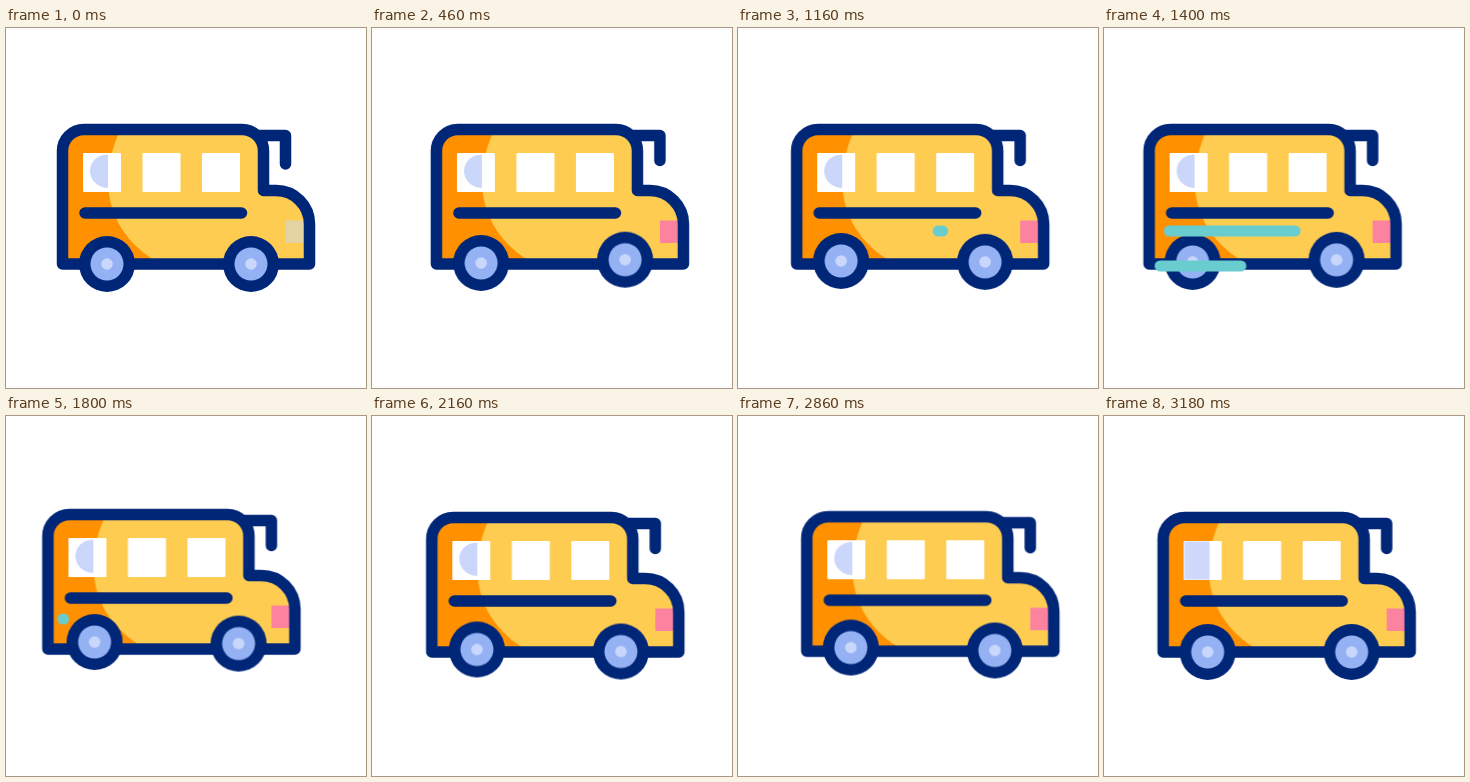
Animation, 360 px wide and 360 px high, one loop 3200 ms. Source, as an HTML page:

```html
<!DOCTYPE html>
<html lang="en">
<head>
<meta charset="utf-8">
<title>School bus</title>
<style>
  html, body { margin: 0; width: 100%; height: 100%; overflow: hidden; background: #fff; }
  svg { display: block; width: 100vw; height: 100vh; }

  .line { fill: none; stroke: #002678; stroke-width: 11.5; stroke-linecap: round; stroke-linejoin: round; }
  .speed { fill: none; stroke: #69ccce; stroke-width: 11; stroke-linecap: round; stroke-dasharray: 100 200; }

  .anim { animation: 3200ms cubic-bezier(.37, 0, .63, 1) infinite; }
  .drive { animation-name: drive; }
  .hop { animation-name: hop; }
  .axles { animation-name: axles; }
  .rear { animation-name: rear; }
  .front { animation-name: front; }
  .lamp { animation-name: lamp; animation-timing-function: step-end; }
  .arm-still { animation-name: still; animation-timing-function: step-end; }
  .arm-moving { animation-name: moving; animation-timing-function: step-end; }
  .glare { animation-name: glare; animation-timing-function: step-end; }
  .pane { animation-name: pane; animation-timing-function: step-end; }
  .upper { animation-name: upper; animation-timing-function: linear; }
  .lower { animation-name: lower; animation-timing-function: linear; }

  @keyframes drive {
    0% { transform: translateX(0); }
    6.875% { transform: translateX(0); animation-timing-function: cubic-bezier(.52, 0, .55, 1); }
    22.5% { transform: translateX(19px); }
    51.25% { transform: translateX(-17px); }
    81.25% { transform: translateX(18.7px); }
    100% { transform: translateX(2.6px); }
  }
  @keyframes hop {
    0%, 14.375% { transform: translateY(0); }
    18.75% { transform: translateY(-6px); }
    23.4%, 46.9% { transform: translateY(0); }
    53.1% { transform: translateY(-6px); }
    59.4%, 81.25% { transform: translateY(0); }
    85.6% { transform: translateY(-6px); }
    90.6%, 100% { transform: translateY(0); }
  }
  @keyframes axles {
    0%, 6.875% { transform: translateX(0); }
    28.75% { transform: translateX(.8px); }
    43.75% { transform: translateX(-1px); }
    56.25% { transform: translateX(2.2px); }
    80.6% { transform: translateX(-1.3px); }
    95%, 100% { transform: translateX(0); }
  }
  @keyframes rear {
    0%, 6.875% { transform: translateY(0); }
    14.375% { transform: translateY(-1px); }
    27% { transform: translateY(-7.5px); }
    40% { transform: translateY(-2px); }
    43.75% { transform: translateY(-2px); }
    55.5% { transform: translateY(-10px); }
    72%, 80.6% { transform: translateY(-1px); }
    87% { transform: translateY(-6px); }
    94%, 100% { transform: translateY(0); }
  }
  @keyframes front {
    0%, 6.875% { transform: translateY(0); }
    20% { transform: translateY(-7px); }
    38% { transform: translateY(-2px); }
    53.5% { transform: translateY(-9px); }
    70%, 80.6% { transform: translateY(0); }
    85% { transform: translateY(-5px); }
    92%, 100% { transform: translateY(0); }
  }
  @keyframes lamp {
    0% { fill: #e3d2a2; }
    6.875%, 100% { fill: #fb839f; }
  }
  @keyframes still { 0% { opacity: 1; } 6.875%, 100% { opacity: 0; } }
  @keyframes moving { 0% { opacity: 0; } 6.875%, 100% { opacity: 1; } }
  @keyframes glare { 0% { opacity: 1; } 96%, 100% { opacity: 0; } }
  @keyframes pane { 0% { opacity: 0; } 96%, 100% { opacity: 1; } }
  @keyframes upper {
    0%, 35.99% { opacity: 0; stroke-dashoffset: -100; }
    36% { opacity: 1; stroke-dashoffset: -100; }
    43.75% { opacity: 1; stroke-dashoffset: -4; }
    45% { opacity: 1; stroke-dashoffset: 0; }
    56.25% { opacity: 1; stroke-dashoffset: 99.5; }
    56.8% { opacity: 1; stroke-dashoffset: 99.9; }
    56.81%, 100% { opacity: 0; stroke-dashoffset: 99.9; }
  }
  @keyframes lower {
    0%, 37.49% { opacity: 0; stroke-dashoffset: -100; }
    37.5% { opacity: 1; stroke-dashoffset: -100; }
    43.75% { opacity: 1; stroke-dashoffset: 0; }
    53.7% { opacity: 1; stroke-dashoffset: 99.9; }
    53.71%, 100% { opacity: 0; stroke-dashoffset: 99.9; }
  }
</style>
</head>
<body>
<svg viewBox="0 0 360 360">
  <defs>
    <path id="shell" d="M56.5 236V123A21.5 21.5 0 0 1 78 101.5H236A21.5 21.5 0 0 1 257.5 123V162.5H270A33.5 33.5 0 0 1 303.5 196V236Z"/>
    <clipPath id="inside"><use href="#shell"/></clipPath>
    <rect id="window" y="125" width="38" height="39" rx="1" fill="#fff"/>
    <g id="wheel">
      <circle r="28" fill="#002678"/>
      <circle r="16.5" fill="#94b2f3"/>
      <circle r="5.8" fill="#cad7fd"/>
    </g>
  </defs>

  <g class="anim drive">
    <g class="anim hop">
      <path class="line anim arm-still" d="M250 107.5H279.5V136"/>
      <path class="line anim arm-moving" d="M250 107.5H280V132.5"/>
      <use href="#shell" fill="#ffcc52"/>
      <path clip-path="url(#inside)" fill="#ff9100" d="M50 95H116L112 107C94 150 98 200 148 232L154 236H50Z"/>
      <use href="#window" x="77"/>
      <use href="#window" x="136.5"/>
      <use href="#window" x="196"/>
      <path class="anim glare" fill="#cbd6fb" d="M102 126.500C78 127 78 159 102 160Z"/>
      <rect class="anim pane" x="77.500" y="125.500" width="25.500" height="38" fill="#cfd9fc"/>
      <rect class="anim lamp" x="280" y="192.500" width="20" height="22.500"/>
      <use href="#shell" class="line"/>
      <path class="line" d="M79 185H235.500"/>
    </g>
    <g class="anim axles">
      <g class="anim rear"><use href="#wheel" x="101" y="236"/></g>
      <g class="anim front"><use href="#wheel" x="245" y="236"/></g>
    </g>
    <path class="speed anim upper" pathLength="100" d="M71.500 203H202.500"/>
    <path class="speed anim lower" pathLength="100" d="M67.500 238H148.500"/>
  </g>
</svg>
</body>
</html>
```
